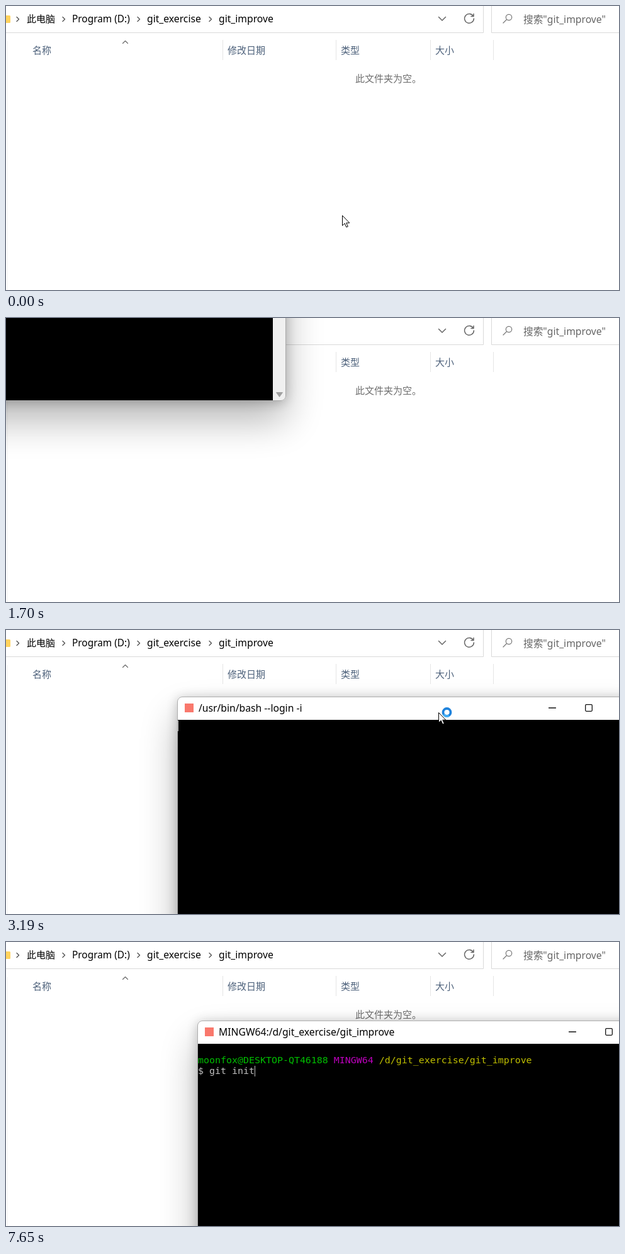
Animation of 974x452 px, one loop 8000 ms. Source, as an HTML page:

```html
<!DOCTYPE html>
<html lang="zh-CN">
<head>
<meta charset="utf-8">
<title>Git Bash Here</title>
<style>
html, body { margin: 0; width: 100%; height: 100%; overflow: hidden; background: #fff; }
svg { display: block; width: 100%; height: 100%; }
text { font: 15.7px "Noto Sans", "Noto Sans CJK SC", "Noto Sans CJK", sans-serif; white-space: pre; }
.cn { font-size: 15px; }
.head { font-size: 15px; fill: #4c607a; }
.mono { font: 14.95px "DejaVu Sans Mono", monospace; fill: #bfbfbf; }
.line { fill: none; stroke-linecap: round; stroke-linejoin: round; }
</style>
</head>
<body>
<svg viewBox="0 0 974 452">
  <defs>
    <filter id="wide" x="-30%" y="-40%" width="160%" height="180%"><feGaussianBlur stdDeviation="30"/></filter>
    <filter id="near" x="-10%" y="-10%" width="120%" height="120%"><feGaussianBlur stdDeviation="9"/></filter>
    <filter id="soft" x="-10%" y="-10%" width="120%" height="120%"><feGaussianBlur stdDeviation="4"/></filter>
    <clipPath id="frame"><rect width="743" height="447" rx="8"/></clipPath>
  </defs>
  <rect width="974" height="452" fill="#fff"/>

  <g id="explorer">
    <path d="M0 42.5H758.5V0M771.5 0V42.5H974" fill="none" stroke="#d9d9d9"/>
    <path d="M2.5 56V452" stroke="#f4f4f4"/>
    <path d="M0 15H5.5a1.5 1.5 0 0 1 1.5 1.5V25.5a1.5 1.5 0 0 1-1.5 1.5H0z" fill="#ffd35c"/>
    <g id="crumbs" class="line" stroke="#555" stroke-width="1.4"></g>
    <text class="cn" x="33" y="26">此电脑</text>
    <text x="105" y="26" style="font-size:15.4px">Program (D:)</text>
    <text x="224" y="26">git_exercise</text>
    <text x="338" y="26">git_improve</text>
    <g class="line" stroke="#666" stroke-width="1.5">
      <path d="M687.5 17.5L693 23L698.5 17.5"/>
      <path d="M742.3 16A7.4 7.4 0 1 0 743.4 20M743 12.5V16.5H739"/>
      <g stroke="#777" stroke-width="1.2"><circle cx="799" cy="18" r="4.7"/><path d="M795.5 21.5L790 27"/></g>
      <path d="M185.5 59.5L189.5 55.5L193.5 59.5" stroke-width="1.1"/>
    </g>
    <text x="822" y="27" fill="#666">搜索"git_improve"</text>
    <path d="M344.5 54V86M524.5 54V86M674.5 54V86M774.5 54V86" stroke="#e5e5e5"/>
    <text class="head" x="42" y="76">名称</text>
    <text class="head" x="352" y="76">修改日期</text>
    <text class="head" x="532" y="76">类型</text>
    <text class="head" x="682" y="76">大小</text>
    <text class="cn" x="555" y="121" fill="#6d6d6d">此文件夹为空。</text>
  </g>

  <g id="menu">
    <g id="sheet" visibility="hidden">
      <rect x="518" y="-32" width="345" height="388" rx="8" opacity=".2" filter="url(#soft)"/>
      <rect x="517.5" y="-34.5" width="345" height="387" rx="8" fill="#f9f9f9" stroke="#d2d2d2"/>
    </g>
    <g id="hot" display="none">
      <rect x="521" y="1" width="338" height="20" rx="3" fill="#0078d7"/>
      <rect id="hotIcon" x="529" y="4" width="14" height="14" fill="#f9786c"/>
      <text id="hotText" class="cn" x="556" y="17" fill="#fff"></text>
    </g>
  </g>

  <g id="win" display="none">
    <rect y="32" width="743" height="447" rx="8" opacity=".28" filter="url(#wide)"/>
    <rect y="2" width="743" height="447" rx="8" opacity=".22" filter="url(#near)"/>
    <g clip-path="url(#frame)">
      <rect width="743" height="447" fill="#fff"/>
      <rect x="1" y="37" width="721" height="409"/>
      <rect x="722" y="37" width="21" height="410" fill="#f0f0f0"/>
      <path d="M727.5 51L732.5 44L737.5 51zM727.5 433.5H737.5L732.5 440.5z" fill="#a0a0a0" stroke="#a0a0a0" stroke-linejoin="round"/>
    </g>
    <rect x=".5" y=".5" width="742" height="446" rx="7.5" fill="none" stroke="#8a8a8a" stroke-opacity=".7"/>
    <rect x="12" y="11" width="14" height="14" fill="#f9786c"/>
    <text id="title" x="34" y="24"></text>
    <g class="line" stroke="#111" stroke-width="1.3">
      <path d="M590.5 18H601.5M708 13L718.5 23.5M718.5 13L708 23.5"/>
      <rect x="648.7" y="12.7" width="10.6" height="10.6" rx="1.5"/>
    </g>
    <g id="prompt">
      <text class="mono" x="1" y="68"><tspan fill="#00bf00">moonfox@DESKTOP-QT46188</tspan> <tspan fill="#bf00bf">MINGW64</tspan> <tspan fill="#bfbf00">/d/git_exercise/git_improve</tspan></text>
      <text id="typed" class="mono" x="1" y="85"></text>
    </g>
    <rect id="caret" width="1" height="17" fill="#bfbfbf"/>
  </g>

  <g id="arrow">
    <path d="M.5 .5V16.5L4.2 13L6.8 19L9.3 18L6.7 12.2H11.8z" fill="#fff" stroke="#000" stroke-linejoin="round"/>
    <g id="busy" fill="none" stroke-width="3.8">
      <circle cx="13.5" r="6" stroke="#1e82dc"/>
      <path id="glint" d="M13.5 -6A6 6 0 0 1 19.5 0" stroke="#48aef2"/>
    </g>
  </g>
  <path id="beam" d="M-3.5 -7.5H-1L0 -6.5L1 -7.5H3.5M0 -6.5V6.5M-3.5 7.5H-1L0 6.5L1 7.5H3.5" fill="none" stroke="#fff"/>
</svg>
<script>
const LOOP = 8000, ROW = 22, GAP = 7, MENU_TOP = -30;
const $ = id => document.getElementById(id);
const NS = "http://www.w3.org/2000/svg";

function add(parent, tag, attrs, text = "") {
  const el = document.createElementNS(NS, tag);
  for (const k in attrs) el.setAttribute(k, attrs[k]);
  el.textContent = text;
  parent.append(el);
}
const show = (id, on) => $(id).setAttribute("display", on ? "inline" : "none");
const place = (id, [x, y]) => $(id).setAttribute("transform", `translate(${x} ${y})`);

// Linear path through [time, x, y] points.
function along(keys, t) {
  const i = keys.findIndex(k => k[0] > t);
  if (i === 0) return keys[0].slice(1);
  if (i < 0) return keys[keys.length - 1].slice(1);
  const [t0, x0, y0] = keys[i - 1], [t1, x1, y1] = keys[i];
  const p = (t - t0) / (t1 - t0);
  return [Math.round(x0 + (x1 - x0) * p), Math.round(y0 + (y1 - y0) * p)];
}

const POINTER = [[0, 534, 333], [240, 500, 350], [400, 517, 357], [560, 560, 300],
  [880, 672, 202], [1120, 653, 200], [1530, 653, 200], [1700, 117, -320]];
const DRAG = [[2739, -298, -315], [2740, -258, -285], [2830, 20, -122], [2920, 227, 17],
  [3010, 256, 72], [3190, 272, 106], [3280, 296, 120], [3370, 304, 125]];
const BEAM = [[3460, 704, 165], [3640, 640, 212], [3820, 588, 236], [4000, 576, 234], [4180, 572, 231]];
const COMMAND = "git init";
const KEY_TIMES = [5830, 6010, 6190, 6710, 6880, 7050, 7220, 7650];
const MENU = ["查看(V)", "排序方式(O)", "分组依据(P)", "刷新(E)", "-", "自定义文件夹(F)...", "-",
  "粘贴(P)", "粘贴快捷方式(S)", "撤消 删除(U)", "-", "Git GUI Here", "Git Bash Here", "-",
  "在终端中打开(T)", "-", "固定到快速访问(Q)", "授予访问权限(G)", "-", "新建(W)", "-", "属性(R)"];

for (const x of [19, 92, 211, 325])
  add($("crumbs"), "path", { d: `M${x - 2} 17.5L${x + 1.5} 21L${x - 2} 24.5` });

function buildMenu() {
  const rows = [];
  let y = MENU_TOP;
  for (const label of MENU) {
    if (label === "-") {
      add($("sheet"), "path", { d: `M518 ${y + 3.5}H862`, stroke: "#dcdcdc" });
      y += GAP;
      continue;
    }
    const git = label.startsWith("Git");
    rows.push({ label, y, git });
    if (git) add($("sheet"), "rect", { x: 529, y: y + 4, width: 14, height: 14, fill: "#f9786c" });
    add($("sheet"), "text", { class: "cn", x: 556, y: y + 17 }, label);
    y += ROW;
  }
  $("sheet").removeAttribute("visibility");
  return rows;
}
const menuRows = buildMenu();

function tick(t) {
  const [start, step] = t < 1360 ? [0, 80] : t < 2740 ? [1360, 85] : [2740, 90];
  return start + Math.floor((t - start) / step) * step;
}

function drawMenu(t, y) {
  const chosen = t >= 1360;
  const fade = chosen ? Math.max(0, 1 - (t - 1360) / 300) : 1;
  const row = menuRows.find(r => chosen ? r.label === "Git Bash Here" : y >= r.y && y < r.y + ROW);
  const hot = row && t >= 400 && fade > 0;
  show("sheet", t >= 400 && !chosen);
  show("hot", hot);
  if (!hot) return;
  place("hot", [0, row.y]);
  $("hot").setAttribute("opacity", fade);
  $("hotText").textContent = row.label;
  show("hotIcon", row.git);
}

function drawTerminal(t, now) {
  const ready = t >= 3370;
  const keys = KEY_TIMES.filter(k => k <= now).length;
  const blink = now >= 3660 && now < 5220 && Math.floor((now - 3660) / 520) % 2 === 0;
  $("title").textContent = ready ? "MINGW64:/d/git_exercise/git_improve" : "/usr/bin/bash --login -i";
  $("typed").textContent = "$ " + COMMAND.slice(0, keys);
  show("prompt", ready);
  show("caret", !ready || keys > 0 || blink);
  place("caret", ready ? [19 + 9 * keys, 72] : [1, 38]);
}

function draw(now) {
  const t = tick(now);
  const spot = along(DRAG, t);
  const pointer = t < 1700 ? along(POINTER, t) : [spot[0] + 415, spot[1] + 25];
  drawMenu(t, pointer[1]);
  drawTerminal(t, now);
  show("win", t >= 1700);
  place("win", spot);
  place("arrow", pointer);
  place("beam", along(BEAM, t));
  show("arrow", t < 3460);
  show("beam", t >= 3460 && now < 5920);
  show("busy", t >= 1360);
  $("glint").setAttribute("transform", `rotate(${(t - 1530) * 0.36 - 90} 13.5 0)`);
}

const begin = performance.now();
function loop() {
  draw((performance.now() - begin) % LOOP);
  requestAnimationFrame(loop);
}
loop();
</script>
</body>
</html>
```
